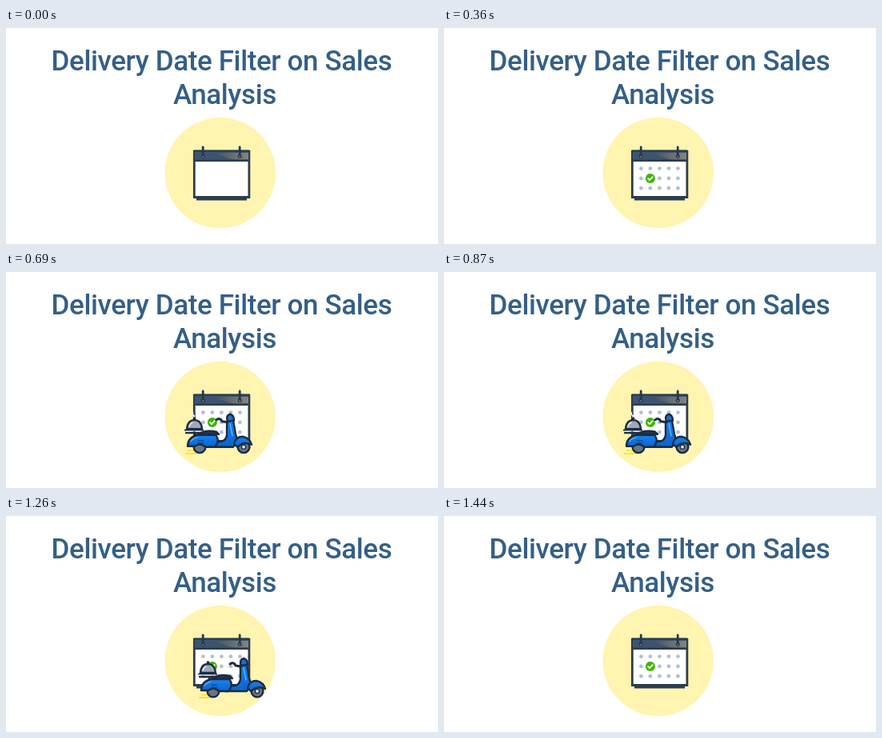
Write an HTML page that moves like this. It is 540x270 px and loops after 1800 ms.

```html
<!DOCTYPE html>
<html lang="en">
<head>
<meta charset="utf-8">
<title>Delivery Date Filter</title>
<style>
  html, body { margin: 0; width: 100%; height: 100%; overflow: hidden; background: #fff; }
  svg { display: block; width: 100%; height: 100%; }
  .title { font: 500 35px Roboto, sans-serif; letter-spacing: -.4px; fill: #345f87; text-anchor: middle; }
  .ink { stroke: #1d2c40; stroke-width: 2.4; stroke-linejoin: round; stroke-linecap: round; }
  .line { fill: none; stroke-linecap: round; stroke-linejoin: round; }
</style>
</head>
<body>
<svg viewBox="0 0 540 270">
  <defs>
    <clipPath id="disc"><circle cx="267.7" cy="181" r="69.2"/></clipPath>
    <linearGradient id="shine"><stop stop-color="#3d4b58"/><stop offset="1" stop-color="#85857f"/></linearGradient>
    <linearGradient id="paint" x2="0" y2="1"><stop stop-color="#1784f0"/><stop offset="1" stop-color="#0c62cc"/></linearGradient>
  </defs>
  <g class="title">
    <text x="269.5" y="53">Delivery Date Filter on Sales</text>
    <text x="273.5" y="95">Analysis</text>
  </g>
  <circle cx="267.7" cy="181" r="69.2" fill="#fff4b0"/>

  <g id="calendar">
    <path d="M238 210h63v5.5h-63z" fill="#2b3d50"/>
    <path d="M235.3 154.2h68.6v57.3h-68.6z" fill="#fff" stroke="#2b3d50" stroke-width="2.8"/>
    <path d="M236 155h67v11h-67z" fill="#3d5470"/>
    <path d="M256 156h47v8.5h-19z" fill="url(#shine)"/>
    <path d="M235 153.8h69M235 165.8h69" stroke="#2b3d50" stroke-width="2.4"/>
    <g fill="#26384b">
      <circle cx="246.2" cy="160.5" r="2.5"/><circle cx="292.2" cy="160.5" r="2.5"/>
      <path d="M246.2 149v11M292.2 149v11" stroke="#26384b" stroke-width="2.8" stroke-linecap="round"/>
      <path d="M245.2 161h2M291.2 161h2" stroke="#a7adb2"/>
    </g>
    <g id="dots" fill="#b3bfd2"></g>
    <g id="check">
      <circle r="6" fill="#3db500"/>
      <path class="line" d="M-2.8 .2l2 2 3.6-3.9" stroke="#fff" stroke-width="1.8"/>
    </g>
  </g>

  <g clip-path="url(#disc)">
    <g id="scooter">
      <path class="line" d="M229 223.5h3M234 223.5h6M226 227.2h3M231 227.2h7" stroke="#ffdf00" stroke-width="1.7"/>
      <g class="ink">
        <circle cx="243" cy="219" r="7.4" fill="#687786"/>
        <circle cx="298" cy="219" r="7.4" fill="#687786"/>
        <circle cx="298" cy="219" r="2.6" fill="#dce4e9" stroke-width="1.4"/>
        <path d="M277 187Q281 182 285 186L288 203Q292 211 285 219H258L262 212H270Q276 211 277 204Z" fill="url(#paint)"/>
        <path d="M286 215Q288 206 297 206Q306 208 308 216Q302 213 296 215L290 219Z" fill="url(#paint)"/>
        <path d="M228 218Q228 207 240 204H263Q269 210 262 219H250Q244 213 237 218Z" fill="url(#paint)"/>
        <path d="M241 203Q251 197 264 200L267 203Z" fill="#263850"/>
        <path class="line" d="M264 185Q269 182 271 187L278 188" stroke-width="3"/>
        <path d="M278 187Q275 180 281 178Q286 179 286 186Z" fill="#176fce"/>
      </g>
      <path class="line" d="M241 211h7M241 214h7" stroke="#0b3f84" stroke-width="1.2"/>
      <path class="line" d="M281 190L284 205" stroke="#65b4ff" stroke-width="1.3"/>
      <path class="line" d="M232 212Q235 208 240 207" stroke="#65b4ff" stroke-width="1.2"/>
      <g id="dish">
        <path class="line" d="M234.5 175.5q-1 2 .7 3.2t.7 3" stroke="#fff" stroke-width="1.5"/>
        <path class="ink line" d="M226 201h20M238 201v3" stroke-width="2"/>
        <path class="ink" d="M227 196Q228 185 236.5 185T246 196Z" fill="#9ea9b5" stroke-width="1.8"/>
        <path class="line" d="M230 193Q231 189 234 188" stroke="#dce4e9" stroke-width="1.5"/>
        <circle cx="236.5" cy="183" r="1.8" fill="#1d2c40"/>
        <path class="line" d="M225 197.5h22" stroke="#1d2c40" stroke-width="2.2"/>
        <path class="line" d="M226 198.7h20" stroke="#c8d0d8" stroke-width=".9"/>
      </g>
    </g>
  </g>
</svg>
<script>
const LOOP = 1800, STEP = 30, TRAVEL = 128;
const get = id => document.getElementById(id);
const clamp = v => Math.min(1, Math.max(0, v));
const place = (node, x, y, scale = 1) =>
  node.setAttribute('transform', `translate(${x} ${y}) scale(${scale})`);
const colX = i => 246.4 + (i % 5) * 11.5;
const rowY = i => 175.6 + Math.floor(i / 5) * 12.3;
const CHECKED = 6;

const dots = Array.from({ length: 15 }, (_, i) => {
  const dot = document.createElementNS('http://www.w3.org/2000/svg', 'circle');
  dot.setAttribute('cx', colX(i));
  dot.setAttribute('cy', rowY(i));
  return get('dots').appendChild(dot);
});

function draw(t) {
  dots.forEach((dot, i) => dot.setAttribute('r', 2.4 * clamp((t - i * 15) / 60)));
  place(get('check'), colX(CHECKED), rowY(CHECKED), clamp((t - 270) / 90));

  // Ease out on arrival, ease in on departure.
  const arrive = clamp((760 - t) / 360) ** 3;
  const leave = clamp((t - 1080) / 360) ** 3;
  const bob = Math.sin(t / 180 * 2 * Math.PI);
  place(get('scooter'), TRAVEL * (leave - arrive), 0.3 * bob);
  place(get('dish'), 0, -0.5 * bob);
  get('scooter').style.display = t < 400 || t >= 1440 ? 'none' : '';
}

function tick(now) {
  draw(Math.floor(now % LOOP / STEP) * STEP);
  requestAnimationFrame(tick);
}
tick(performance.now());
</script>
</body>
</html>
```
